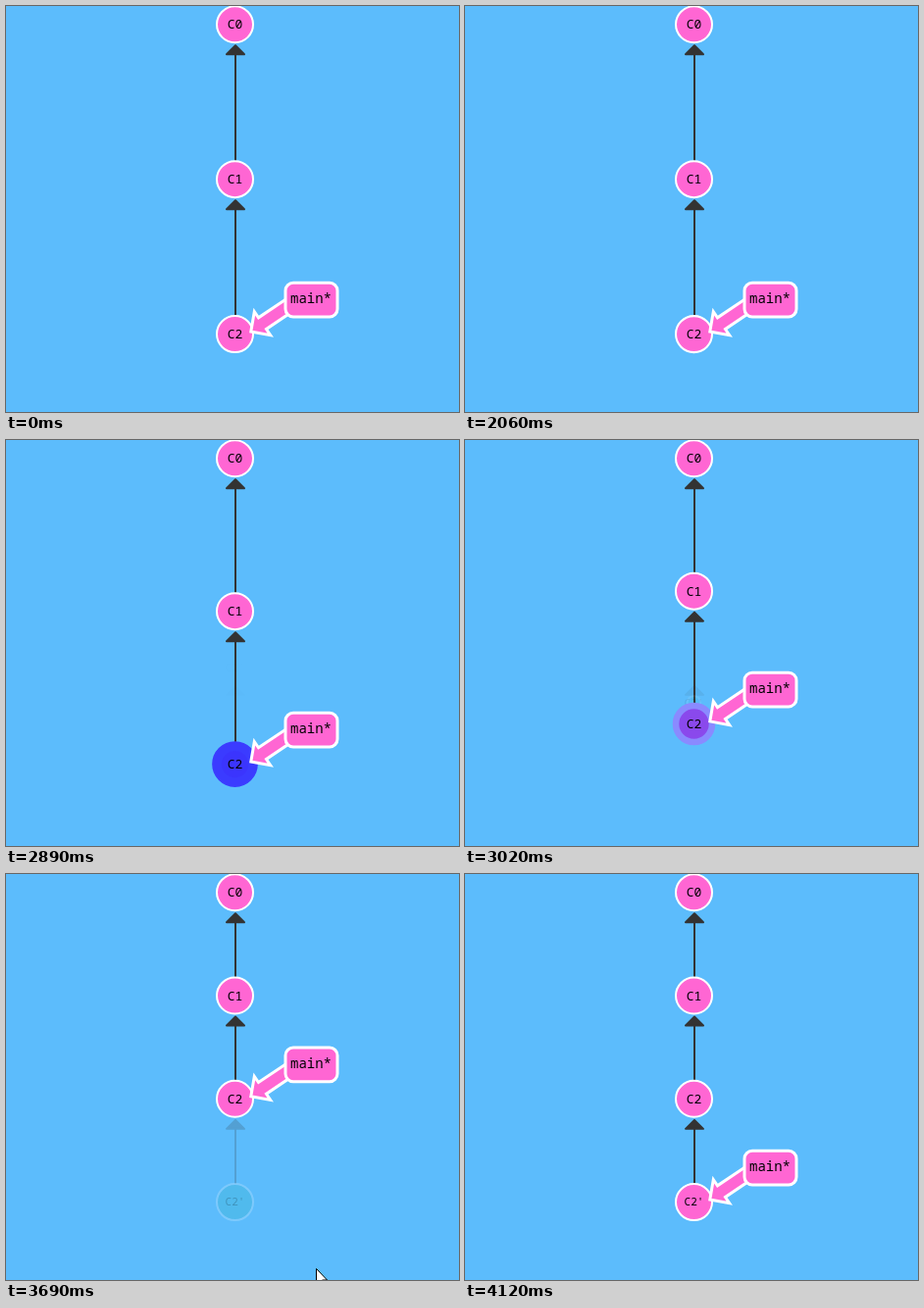
An HTML page for the animation above (5590 ms loop, 462 px wide and 414 px high).

```html
<!DOCTYPE html>
<html lang="en">
<head>
<meta charset="utf-8">
<title>Commit graph</title>
<style>
  html, body { margin: 0; width: 100%; height: 100%; overflow: hidden; background: #5cbcfc; }
  svg { display: block; width: 462px; height: 414px; font-family: "Noto Sans Mono", monospace; }
  text { text-anchor: middle; }
</style>
</head>
<body>
<svg id="stage" viewBox="0 0 462 414"></svg>
<script>
const LOOP = 5590;
const CX = 233.5, TOP = 18.8, BOTTOM = 334.6, RADIUS = 18.5;
const PINK = [255, 102, 211], BLUE = [51, 51, 255], TEAL = [36, 179, 179], WHITE = [255, 255, 255];
const HIGHLIGHT = 2030, MOVE = 2835, BIRTH = 2842, LABEL = 3710;

// The picture advances in steps: [start, step length]
const STEPS = [[0, 2060], [2060, 60], [2890, 64], [3210, 60], [3690, 61]];
// Pointer path: [time, x, y]
const POINTER = [[3210, 60, 281], [3400, 201, 377], [3690, 316, 402], [3751, 407, 411]];

const stage = document.getElementById('stage');
const lerp = (a, b, p) => a + (b - a) * p;
const mix = (a, b, p) => `rgb(${a.map((v, i) => Math.round(lerp(v, b[i], p)))})`;
const progress = (t, start, length) => Math.min(1, Math.max(0, (t - start) / length));

// Closed form of cubic-bezier(.42, 0, .58, 1)
function easeInOut(n) {
  if (n <= 0 || n >= 1) return n;
  const q = 0.48 - n / 1.04, r = Math.sqrt(0.1734 + q * q);
  const s = Math.cbrt(r - q) + Math.cbrt(-r - q) + 0.5;
  return s * s * (3 - 2 * s);
}

function bounce(n) {
  const k = 7.5625, d = 2.75;
  if (n < 1 / d) return k * n * n;
  if (n < 2 / d) return k * (n - 1.5 / d) ** 2 + 0.75;
  if (n < 2.5 / d) return k * (n - 2.25 / d) ** 2 + 0.9375;
  return k * (n - 2.625 / d) ** 2 + 0.984375;
}

function snap(t) {
  const [start, step] = STEPS.findLast(s => s[0] <= t);
  return start + Math.floor((t - start) / step) * step;
}

function edge(parentY, childY, opacity = 1) {
  const base = parentY + 30.5, end = Math.max(base, childY - 19);
  return `<g opacity="${opacity}" fill="#333" stroke="#333" stroke-width="2" stroke-linejoin="round">
    <path d="M234 ${base}V${end}M234 ${parentY + 21.5}l9 9h-18z"/></g>`;
}

function node(name, y, { fill = mix(PINK, PINK, 0), stroke = '#fff', width = 2, r = RADIUS, opacity = 1 } = {}) {
  const size = name.length > 2 ? 11 : 13;
  return `<circle cx="${CX}" cy="${y}" r="${r}" fill="${fill}" stroke="${stroke}" stroke-width="${width}" opacity="${opacity}"/>
    <text x="${CX}" y="${y + size * 0.35}" font-size="${size}" font-weight="500" opacity="${opacity}">${name}</text>`;
}

function label(y) {
  return `<g transform="translate(0 ${y - BOTTOM})">
    <g fill="${mix(PINK, PINK, 0)}" stroke="#fff" stroke-width="3">
      <path d="M249.8 332L253.3 311.6L257.5 317.8L287 298L295 309.6L265.5 329.5L269.7 335.7Z"/>
      <rect x="285" y="282.3" width="53" height="34.7" rx="8"/>
    </g>
    <text x="311" y="303.3" font-size="14">main*</text></g>`;
}

function pointer(t) {
  const i = POINTER.findLastIndex(p => p[0] <= t);
  if (i < 0 || t >= 3800) return '';
  const a = POINTER[i], b = POINTER[i + 1] || a;
  const p = b === a ? 0 : (t - a[0]) / (b[0] - a[0]);
  return `<path transform="translate(${Math.round(lerp(a[1], b[1], p))} ${Math.round(lerp(a[2], b[2], p))})"
    d="M.5 .5V16.5L4 13L6.5 18.5L9 17.5L6.5 12H11.5Z" fill="#fff" stroke="#000"/>`;
}

function draw(time) {
  const t = snap(time);
  const moved = easeInOut(progress(t, MOVE, 400));
  const born = bounce(progress(t, BIRTH, 800));
  const adopted = easeInOut(progress(t, LABEL, 400));
  const glow = easeInOut(progress(t, HIGHLIGHT, 528)) * (1 - moved);

  const gap = (BOTTOM - TOP) / 3;
  const y1 = lerp(TOP + gap * 1.5, TOP + gap, moved);
  const y2 = lerp(BOTTOM, TOP + gap * 2, moved);
  const opacity = lerp(0.2 * born, 1, adopted);

  let graph = edge(TOP, y1) + edge(y1, y2);
  if (t >= BIRTH) {
    const parentY = TOP + gap * 2;
    graph += edge(parentY, lerp(parentY, BOTTOM, moved), opacity)
      + node("C2'", lerp(parentY, BOTTOM, born), { fill: mix(TEAL, PINK, adopted), r: RADIUS * born, opacity });
  }
  graph += node('C0', TOP) + node('C1', y1)
    + node('C2', y2, { fill: mix(PINK, BLUE, glow), stroke: mix(WHITE, BLUE, glow), width: 2 + 8 * glow });
  stage.innerHTML = graph + label(lerp(y2, BOTTOM, adopted)) + pointer(t);
}

const begin = performance.now();
function frame() {
  draw((performance.now() - begin) % LOOP);
  requestAnimationFrame(frame);
}
frame();
</script>
</body>
</html>
```
